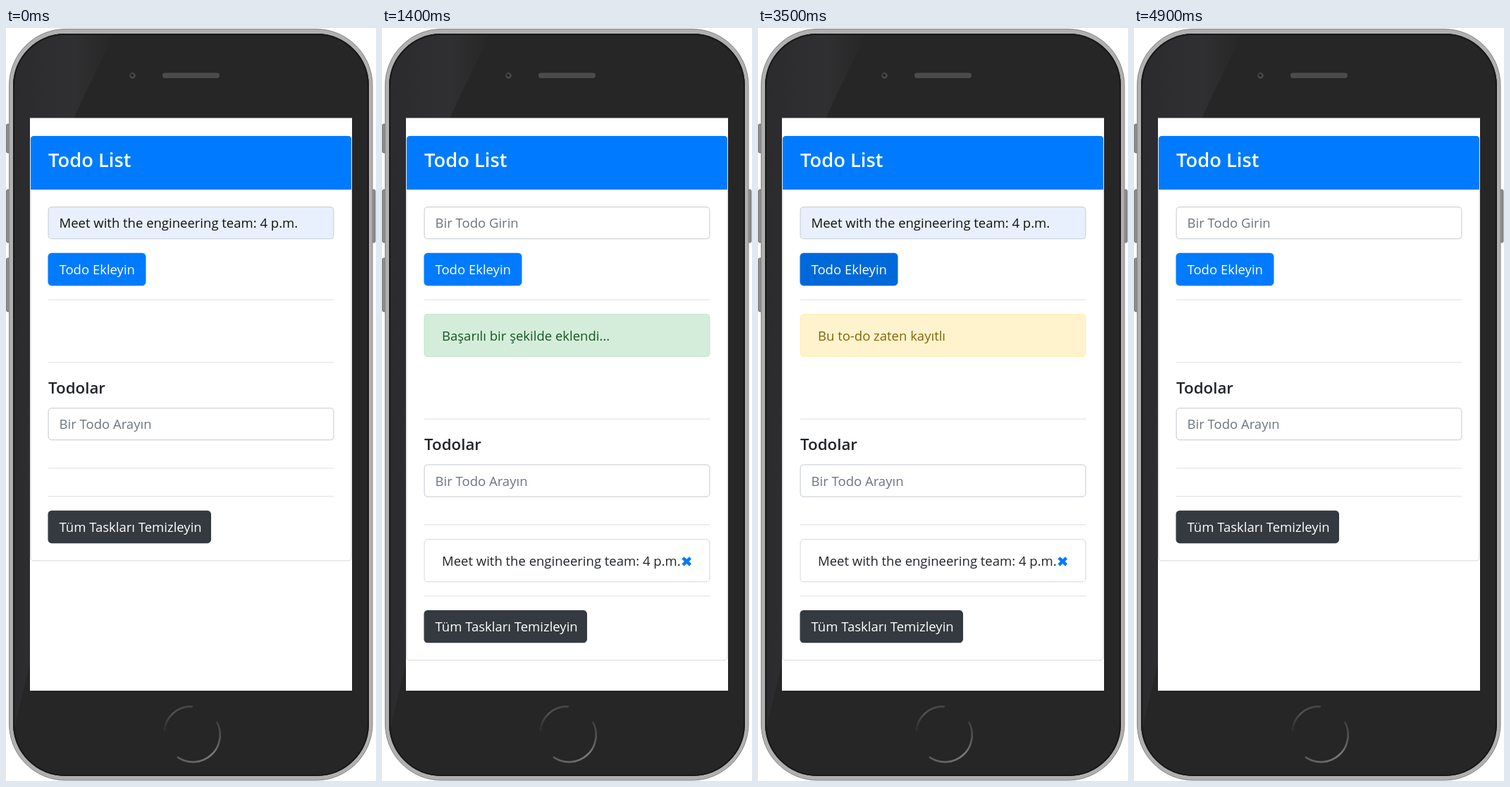
An HTML page that plays this animation: 525x1067 px, repeating every 5.6 s.

```html
<!DOCTYPE html>
<html lang="tr">
<head>
<meta charset="utf-8">
<style>
html, body { margin: 0; width: 100%; height: 100%; overflow: hidden; background: #fff; }
svg { display: block; }
text { font: 18.5px "Open Sans", "Noto Sans", sans-serif; fill: #212529; white-space: pre; }
.title { font-size: 27.3px; font-weight: 600; fill: #fff; }
.heading { font-size: 22.3px; font-weight: 600; }
</style>
</head>
<body>
<svg width="525" height="1067" viewBox="0 0 525 1067">
  <defs>
    <linearGradient id="shine" x1="0" y1="0" x2="1" y2=".12">
      <stop offset="0" stop-color="#2b2b2d"/><stop offset=".6" stop-color="#303032"/><stop offset="1" stop-color="#262626"/>
    </linearGradient>
    <linearGradient id="ringTop" x1="0" y1="1" x2="1" y2="0">
      <stop offset="0" stop-color="#2c2c2c"/><stop offset=".5" stop-color="#505050"/><stop offset="1" stop-color="#444"/>
    </linearGradient>
    <linearGradient id="ringBottom" x1="0" y1="1" x2="1" y2="0">
      <stop offset="0" stop-color="#5a5a5a"/><stop offset=".5" stop-color="#7c7c7c"/><stop offset="1" stop-color="#3a3a3a"/>
    </linearGradient>
    <clipPath id="glass"><rect x="10" y="8" width="505" height="1052" rx="74"/></clipPath>
  </defs>

  <g fill="#8c8c8c" stroke="#666" stroke-width=".8">
    <rect x=".5" y="136" width="6" height="41" rx="2"/>
    <rect x=".5" y="229" width="6" height="75" rx="2"/>
    <rect x=".5" y="326" width="6" height="76" rx="2"/>
    <rect x="518" y="229" width="6" height="75" rx="2"/>
  </g>
  <rect x="4.5" y="1.5" width="515.5" height="1064.5" rx="80" fill="#b0b0b0" stroke="#858585"/>
  <rect x="10" y="8" width="505" height="1052" rx="74" fill="#262626"/>
  <path d="M10 8H153L96 128H34V900L10 1000Z" fill="url(#shine)" clip-path="url(#glass)"/>
  <rect x="11" y="9" width="503" height="1050" rx="73" fill="none" stroke="#181818" stroke-width="2"/>
  <circle cx="179.5" cy="67.5" r="4.3" fill="#484848"/>
  <circle cx="179" cy="67" r="2" fill="#222"/>
  <rect x="222" y="63.5" width="81" height="7.5" rx="3.7" fill="#4b4b4b"/>
  <g fill="none" stroke-width="2.6">
    <path d="M224.5 997A38 38 0 0 1 265 961.5" stroke="url(#ringTop)"/>
    <path d="M299 983A38.5 38.5 0 0 1 243 1033" stroke="url(#ringBottom)"/>
  </g>
  <rect x="34" y="127.5" width="457" height="811.5" fill="#fff"/>
  <g id="app"></g>
</svg>
<script>
const task = "Meet with the engineering team: 4 p.m.";
const STEP = 700;
const ALERT_SHIFT = 80.3, ITEM_SHIFT = 60.8;
const green = ["#d4edda", "#c3e6cb", "#155724"];
const yellow = ["#fff3cd", "#ffeeba", "#856404"];

const states = [
  { typed: true },
  { item: true, pressed: true },
  { item: true, message: "Başarılı bir şekilde eklendi...", tone: green },
  { item: true },
  { message: "To-do başarıyla silindi", tone: green },
  { item: true, typed: true, pressed: true, message: "Bu to-do zaten kayıtlı", tone: yellow },
  { item: true },
  {}
];

const label = (x, y, str, fill) => `<text x="${x}" y="${y}" style="fill:${fill}">${str}</text>`;
const heading = (y, str, cls) => `<text x="60" y="${y}" class="${cls}">${str}</text>`;
const box = (y, w, h, fill, stroke = fill) =>
  `<rect x="60.1" y="${y + .6}" width="${w - 1.2}" height="${h - 1.2}" rx="4.6" fill="${fill}" stroke="${stroke}" stroke-width="1.25"/>`;
const rule = y => `<path d="M60 ${y}H465.5" stroke="#e5e5e5" stroke-width="1.25"/>`;
const input = (y, str, filled) =>
  box(y, 406, 46.3, filled ? "#e8f0fe" : "#fff", "#ced4da") + label(75.5, y + 30.3, str, filled ? "#111" : "#6c757d");
const button = (y, w, str, fill) => box(y, w, 46.3, fill) + label(75.5, y + 30.3, str, "#fff");
const panel = (y, str, [fill, stroke, ink]) => box(y, 406, 61, fill, stroke) + label(85, y + 37.8, str, ink);

function draw({ typed, item, pressed, message, tone }) {
  const top = message ? ALERT_SHIFT : 0;
  const end = top + (item ? ITEM_SHIFT : 0);
  const cross = `<path d="M427 ${top + 670.5}l10.5 10m0-10l-10.5 10" stroke="#007bff" stroke-width="4.6"/>`;
  return [
    `<rect x="35" y="153.3" width="455" height="${601.5 + end}" rx="4.5" fill="#fff" stroke="#dfdfdf" stroke-width="1.25"/>`,
    `<path d="M35 229V157.500q0-4.500 4.500-4.500H485.500q4.500 0 4.500 4.500V229Z" fill="#007bff"/>`,
    heading(197, "Todo List", "title"),
    input(253, typed ? task : "Bir Todo Girin", typed),
    button(318.8, 139, "Todo Ekleyin", pressed ? "#0069d9" : "#007bff"),
    rule(385),
    message ? panel(405, message, tone) : "",
    rule(473.8 + top),
    heading(518 + top, "Todolar", "heading"),
    input(538 + top, "Bir Todo Arayın"),
    rule(623.6 + top),
    item ? panel(643.8 + top, task, ["#fff", "#dfdfdf", "#212529"]) + cross : "",
    rule(663.7 + end),
    button(683.8 + end, 231.5, "Tüm Taskları Temizleyin", "#343a40")
  ].join("");
}

const app = document.getElementById("app");
let shown = -1;
function tick() {
  const index = Math.floor(performance.now() / STEP) % states.length;
  if (index !== shown) app.innerHTML = draw(states[shown = index]);
  requestAnimationFrame(tick);
}
tick();
</script>
</body>
</html>
```
